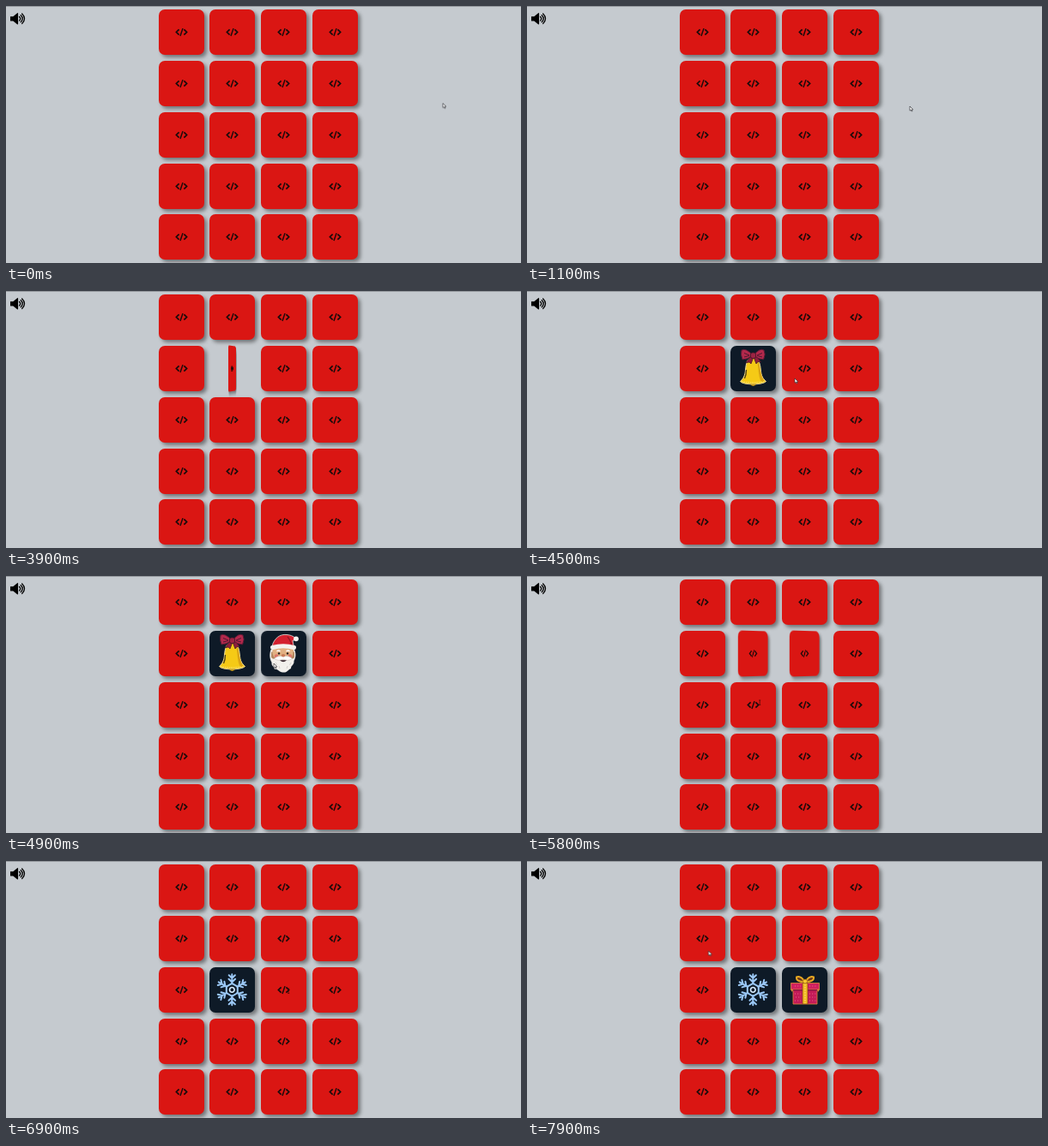
An HTML page that plays this animation: 600 by 300 pixels, repeating every 8 s.

```html
<!DOCTYPE html>
<html lang="en">
<head>
<meta charset="utf-8">
<title>Memory cards</title>
<style>
  html, body { margin: 0; width: 100%; height: 100%; overflow: hidden; }
  body { position: relative; background: #c5cacf; }
  #edge { position: absolute; left: 0; top: 0; width: 100%; height: 1px; background: #969a9f; }
  #sound { position: absolute; left: 4px; top: 6px; }
  .slot { position: absolute; width: 53px; height: 53px; perspective: 1000px; }
  .card { width: 100%; height: 100%; transform-style: preserve-3d; }
  .face {
    position: absolute; inset: 0; border-radius: 7px; background: #da1613;
    box-shadow: 3px 3px 4px rgba(0, 0, 0, .42); backface-visibility: hidden;
  }
  .back { background: #0e1a27; transform: rotateY(180deg); }
  svg { display: block; }
  #pointer { position: absolute; left: 0; top: 0; }
  #pointer svg { position: absolute; overflow: visible; }
</style>
</head>
<body>
<div id="edge"></div>
<svg id="sound" width="19" height="18" viewBox="0 0 19 18">
  <path d="M1 6.2h3.3L9.2 2.2q.9-.5.9.6v12q0 1.1-.9.6L4.3 11.500H1z"/>
  <path d="M11.600 6.500q2.200 2.300 0 4.600M13.200 4.700q4 4.100 0 8.200M14.700 3q5.600 5.800 0 11.600"
        fill="none" stroke="#000" stroke-width="1.300" stroke-linecap="round"/>
</svg>
<div id="board"></div>
<div id="pointer">
  <svg id="arrow" width="5" height="7"><path d="M0 0V5.200L1.300 4.200 2.100 6 3 5.600 2.200 3.900H3.800z" fill="#fff" stroke="#34363a" stroke-width=".7"/></svg>
  <svg id="beam" width="3" height="6"><path d="M.2 0H2.200M1.200 0V5.500M.2 5.500H2.200" fill="none" stroke="#3d0908" stroke-width=".7"/></svg>
</div>
<script>
const LOOP = 8000, STEP = 100, FLIP = 500;
const PITCH = 59.8, LEFT = 177.5, TOP = 4.2;

const code = `<g fill="none" stroke="#170b0b" stroke-width="1.7">
  <path d="M23.600 23.400 20.400 26.500 23.600 29.600M29.400 23.400 32.600 26.500 29.400 29.600"/>
  <path d="M28 22.100 25 31" stroke-width="1.400"/></g>`;

const bell = `
  <path d="M26 14C19 14 18.500 20 17.500 28 17 35 15 38 11.500 41.500 14 46 38 46 41.500 41.500 37.500 38 36 35 35.300 28 34.500 20 33 14 26 14z"
    fill="#f5ca16" stroke="#e9d9a0" stroke-width="1"/>
  <path d="M31 18C33 25 32 36 36 42L40 41.500C35 37 35 24 32.500 18z" fill="#dba514"/>
  <path d="M18.500 28Q18.500 34 16.500 38" fill="none" stroke="#4a3c12" stroke-width="1.300"/>
  <path d="M13 41.500Q26 44.500 40 41.500" fill="none" stroke="#fff0a0" stroke-width=".8" stroke-dasharray="1.500 1"/>
  <path d="M22.500 44.600Q26.500 49.500 30.500 44.600z" fill="#c79a1c"/>
  <path d="M24 12 18 20 22 19 24 21 27 13 30 21 32 18.500 35.500 19 30 11z" fill="#8d1f3c" stroke="#3b1526" stroke-width=".7"/>
  <path d="M26 11Q18 2 13 5 11.500 10 14 16 20 16 26 11zM27 11Q34 2 39 5 41.500 10 38.500 16 33 16 27 11z"
    fill="#b3294c" stroke="#571a34" stroke-width="1"/>
  <path d="M16 8.500 22 11M16 13 22 11.500M37 8.500 31 11M37 13 31 11.500" stroke="#4d1830"/>
  <rect x="23.500" y="8" width="6" height="6.500" rx="2" fill="#9c2443" stroke="#3b1526" stroke-width=".8"/>`;

const santa = `
  <path d="M11.500 22C9 29 11 34 12.500 37 12 41 15 41 16 45 20 44 21 49 26 48.500 31 49 32 45 35 44 35 40 39 40 38.500 35 41 31 41 26 39 22z" fill="#f2f0ec"/>
  <path d="M13.500 20H38V28Q36 34 26 33 15 34 13.500 28z" fill="#e2b183"/>
  <path d="M12 25V31Q14 34 17 32 13.500 30 13.500 24zM39 25V31Q37 34 34 32 37.500 30 37.500 24z" fill="#b3875f"/>
  <circle cx="18" cy="29.500" r="2.200" fill="#dc7468"/><circle cx="34" cy="29.500" r="2.200" fill="#dc7468"/>
  <path d="M18.500 24Q20.500 22 22.500 24M29.500 24Q31.500 22 33.500 24" fill="none" stroke="#fff" stroke-width="1.300"/>
  <circle cx="21" cy="26.400" r="1.200" fill="#20191a"/><circle cx="31" cy="26.400" r="1.200" fill="#20191a"/>
  <path d="M26 30Q20 28 15.500 32.500 21 36 26 33 31 36 36.500 32.500 32 28 26 30z" fill="#fff" stroke="#c8beb8" stroke-width=".6"/>
  <ellipse cx="26" cy="28.700" rx="2.200" ry="1.800" fill="#c97c59"/>
  <path d="M22 34.200Q26 38.500 30 34.200z" fill="#33232a"/>
  <path d="M17 37 18.500 40M21 41 22 44M31 41 30 44M35 37 33.500 40" stroke="#c9c6c4" stroke-width=".8"/>
  <path d="M13 18C15 9 22 3.500 30 4.500 36 5 39 7 41 10L37 11.500 38.500 19z" fill="#d4202f" stroke="#ece7e4" stroke-width=".8"/>
  <path d="M31 7Q34 10 36 17" fill="none" stroke="#8e1724" stroke-width="1.200"/>
  <path d="M13.500 19.500Q26 16 38.500 19.500" fill="none" stroke="#f4f2ef" stroke-width="5" stroke-linecap="round"/>
  <circle cx="41" cy="9.300" r="2.900" fill="#f7f5f2"/>`;

const arm = a => `<path transform="rotate(${a})" d="M0-7V-18M-3.600-17 0-13.500 3.600-17M-3.800-12.500 0-9 3.800-12.500"/>`;
const snow = `<g transform="translate(26.300 26.300)" fill="none" stroke="#9bc8f6" stroke-width="2" stroke-linecap="round">
  ${[0, 60, 120, 180, 240, 300].map(arm).join("")}
  <path d="M0-7.500 6.500-3.700V3.700L0 7.500-6.500 3.700V-3.700z"/>
  <circle r="2.800" stroke="#d4e8fc" stroke-width="1.700"/></g>`;

const gift = `
  <path d="M13 25H41V43H13z" fill="#c31b58" stroke="#e28a3c" stroke-width=".8"/>
  <path d="M10.500 18.500H43.500V26H10.500z" fill="#d1215f" stroke="#e28a3c" stroke-width=".8"/>
  <path d="M13 26.800H41" stroke="#7e123f" stroke-width="1.300"/>
  <path d="M10 26 12 29 13 26zM44 26 42 29 41 26z" fill="#e28a3c"/>
  <path d="M15 22H22M32 22H41M15 31H22M32 31H40M16 35H22M32 35H39M15 39H22M32 39H40" stroke="#ed6a91" stroke-width=".9" stroke-dasharray="1 2.200"/>
  <path d="M24 18.500H30V43H24z" fill="#f0b820" stroke="#7b3b20" stroke-width=".7"/>
  <path d="M27 20V42" stroke="#fff0a0" stroke-width=".8" stroke-dasharray="1.500 1.500"/>
  <path d="M26.500 17Q22 9.500 17 11.500 16 17 26.500 17zM27.500 17Q32 9.500 37 11.500 38 17 27.500 17z" fill="#6b3a1b" stroke="#eaaa22" stroke-width="1.900"/>
  <circle cx="27" cy="16.500" r="2.500" fill="#f6c92e" stroke="#8a4a1a" stroke-width=".6"/>`;

// card index: artwork, time turned up, time turned down
const turns = {
  5: [bell, 3767, 5583],
  6: [santa, 4500, 5583],
  9: [snow, 6350],
  10: [gift, 7150],
};

// time, x, y of the pointer tip
const path = [
  [0, 509, 113.5], [900, 446, 117], [1200, 446, 117], [1500, 114, 118],
  [2000, 114, 118], [2200, 16, 80], [2300, -20, 72], [2800, -20, 66],
  [2900, 132, 64], [3500, 262, 88], [4000, 262, 88], [4400, 312, 102],
  [5100, 312, 102], [5800, 270, 145], [6400, 270, 145], [6800, 328, 149],
  [7350, 328, 149], [7900, 211.500, 105], [8000, 211.500, 105],
];

// spans where the text cursor shows
const beamSpans = [[3500, 4000], [5700, 6500], [6700, 7400]];

const $ = id => document.getElementById(id);
const anims = [];

function play(el, frames) {
  const a = el.animate(frames, { duration: LOOP, fill: "both" });
  a.pause();
  anims.push(a);
}

const art = body => `<svg width="53" height="53" viewBox="0 0 53 53">${body}</svg>`;

function flipFrames(up, down) {
  const key = (t, deg, easing = "linear") => ({ offset: t / LOOP, transform: `rotateY(${deg}deg)`, easing });
  const keys = [key(0, 0), key(up, 0, "ease"), key(up + FLIP, 180)];
  if (down) keys.push(key(down, 180, "ease"), key(down + FLIP, 0));
  keys.push(key(LOOP, down ? 0 : 180));
  return keys;
}

for (let i = 0; i < 20; i++) {
  const slot = document.createElement("div");
  const turn = turns[i];
  slot.className = "slot";
  slot.style.left = LEFT + (i % 4) * PITCH + "px";
  slot.style.top = TOP + Math.floor(i / 4) * PITCH + "px";
  slot.innerHTML = `<div class="card"><div class="face">${art(code)}</div>` +
    (turn ? `<div class="face back">${art(turn[0])}</div>` : "") + "</div>";
  $("board").append(slot);
  if (turn) play(slot.firstChild, flipFrames(turn[1], turn[2]));
}

play($("pointer"), path.map(([t, x, y]) => ({ offset: t / LOOP, transform: `translate(${x}px, ${y}px)` })));

function draw(now) {
  const t = Math.floor((now % LOOP) / STEP) * STEP;
  for (const a of anims) a.currentTime = t;
  const beam = beamSpans.some(([from, to]) => t >= from && t <= to);
  $("beam").style.opacity = beam ? 1 : 0;
  $("arrow").style.opacity = beam ? 0 : 1;
}

const start = performance.now();
function tick() {
  draw(performance.now() - start);
  requestAnimationFrame(tick);
}
tick();
</script>
</body>
</html>
```
